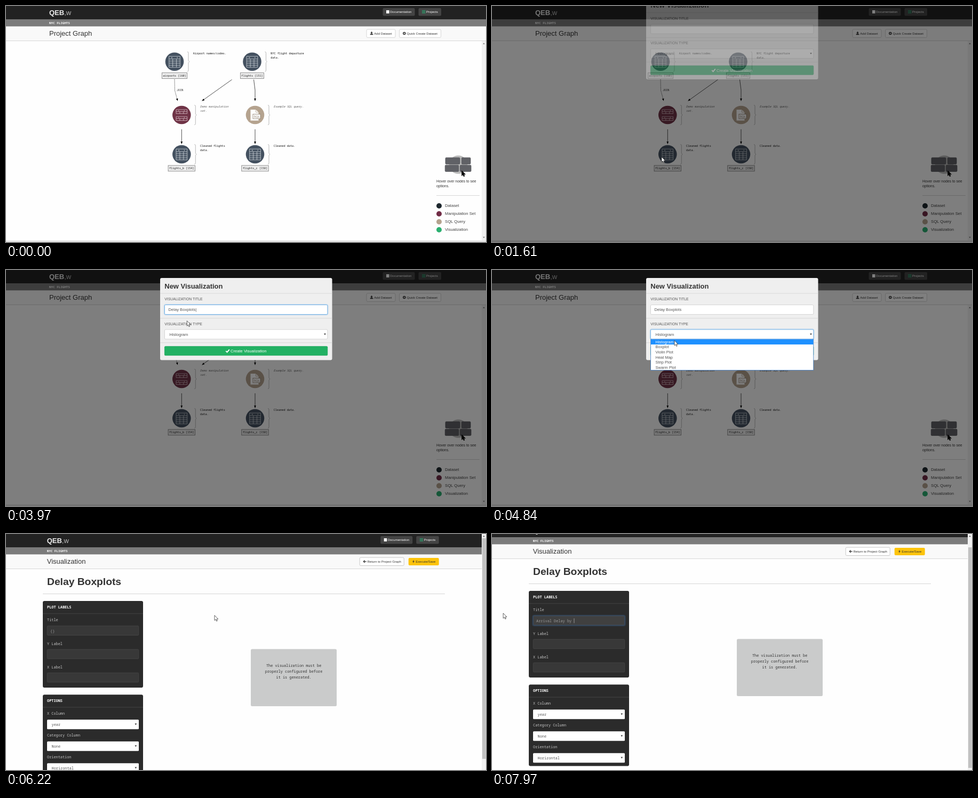
These frames come from a looping animation (900x444 px, 8000 ms). An HTML page:

```html
<!DOCTYPE html>
<html lang="en">
<head>
<meta charset="utf-8">
<title>Project graph</title>
<style>
html, body { margin: 0; width: 100%; height: 100%; overflow: hidden; background: #fff; }
svg { display: block; width: 900px; height: 444px; }
text { font-family: "Liberation Sans", Arial, sans-serif; white-space: pre; }
.m { font-family: "Noto Sans Mono", "DejaVu Sans Mono", monospace; }
.b { font-weight: bold; }
.i { font-style: italic; }
.c { text-anchor: middle; }
</style>
</head>
<body>
<svg id="stage" viewBox="0 0 900 444"></svg>
<script>
const LOOP = 8000, STEP = 125;
const stage = document.getElementById('stage');

// Drawing helpers: each returns SVG markup
const text = (x, y, s, size, fill = '#333', cls = '') =>
  `<text x="${x}" y="${y}" font-size="${size}" fill="${fill}" class="${cls}">${s}</text>`;
const mono = (x, y, s, size = 5.2, fill = '#222', cls = '') => text(x, y, s, size, fill, 'm ' + cls);
const rect = (x, y, w, h, fill, stroke = 'none', r = 0) =>
  `<rect x="${x}" y="${y}" width="${w}" height="${h}" rx="${r}" fill="${fill}" stroke="${stroke}" stroke-width=".8"/>`;
const path = (d, stroke, width = .8, fill = 'none', extra = '') =>
  `<path d="${d}" stroke="${stroke}" stroke-width="${width}" fill="${fill}" ${extra}/>`;
const disc = (x, y, r, fill) => `<circle cx="${x}" cy="${y}" r="${r}" fill="${fill}"/>`;
const group = (x, y, body, opacity = 1) =>
  `<g transform="translate(${x} ${y})" opacity="${opacity}">${body}</g>`;
const hline = (x1, x2, y, color) => path(`M${x1} ${y}H${x2}`, color);
const triangle = (x, y, h = 3, fill = '#333') => path(`M${x - 1.8} ${y - h / 2}h3.6l-1.8 ${h}z`, 'none', 0, fill);
const clamp = v => Math.max(0, Math.min(1, v));

const pointer = (x, y, fill = '#fff', edge = '#222') => group(x, y,
  path('M0 0V9.6L2.2 7.6L3.7 11L5.3 10.3L3.8 7H6.8z', edge, .7, fill));
const beam = (x, y) => path(`M${x - 1.5} ${y - 4.5}h3M${x - 1.5} ${y + 4.5}h3M${x} ${y - 4.5}v9`, '#222', .8);

function header(title, buttons) {
  return rect(0, 0, 900, 25.6, '#222') +
    `<text x="81" y="17" font-size="13" fill="#eee"><tspan class="b">QEB</tspan><tspan fill="#bbb">,w</tspan></text>` +
    rect(706.5, 4, 60, 14.5, '#444', 'none', 2) + rect(713, 8, 5.5, 6, '#fff') +
    text(720, 13.3, 'Documentation', 6, '#fff') +
    rect(773.5, 4, 42.5, 14.5, '#444', 'none', 2) +
    path('M780 8.8h6.5M780 11h6.5M780 13.2h6.5', '#2a9d6c', 1.2) + text(788, 13.3, 'Projects', 6, '#fff') +
    rect(0, 25.6, 900, 13, '#7b7b7b') + mono(81, 34.3, 'NYC FLIGHTS', 5.9, '#fff', 'b') +
    rect(0, 38.6, 900, 27, '#f9f9f9') + hline(0, 900, 65.5, '#d0d0d0') +
    text(81, 56.4, title, 13) + buttons;
}

const tableIcon = () => {
  let d = 'M-10.3 -10H10.3V10.5H-10.3zM-3.4 -5V10.5M3.5 -5V10.5';
  for (let y = -5; y < 9; y += 3.9) d += `M-10.3 ${y}H10.3`;
  return path(d + 'M-6 -8.4l1.6 2M-4.4 -8.4l-1.6 2M4.4 -8.4l.8 1l.8 -1M5.2 -7.4v1', '#dfe4e8', .7);
};
const splitIcon = () => path('M-10.3 -10H10.3V-2.5H-10.3zM-10.3 -6.3H10.3M-3.4 -6.3V-2.5M3.5 -6.3V-2.5' +
  'M-10.3 3H10.3V10.5H-10.3zM-10.3 6.7H10.3M-3.4 6.7V10.5M3.5 6.7V10.5M-5.5 -9v2M5 -9v2M-5.5 4v2M5 4v2', '#e6cfd6', .7);
const sqlIcon = () => path('M-8.5 -10H1.5L6.5 -5V10.5H-8.5z', 'none', 0, '#fff') +
  path('M1.5 -10V-5H6.5', '#b3a18e', .8) + rect(-4, -1.5, 14, 8.5, '#fff', '#8d7d6c') +
  text(3, 5, 'SQL', 5.6, '#8d7d6c', 'c');

function node(x, y, fill, icon, lines, label, cls = '') {
  const w = label.length * 3.12 + 3.6;
  return group(x, y, disc(0, 0, 17.3, fill) + icon() +
    path('M24 -18.5q2 0 2 2V-2l1.8 2L26 2V16.5q0 2 -2 2', '#999', .7) +
    lines.map((s, i) => mono(34.8, -13.8 + 7.8 * i, s, 5.2, cls ? '#555' : '#111', cls)).join('') +
    (label && rect(-w / 2, 21, w, 10.8, '#eee', '#777') + mono(0, 28.2, label, 5.2, '#222', 'c')));
}

function edge(points, dashed) {
  const [[ax, ay], [bx, by]] = points.slice(-2);
  const angle = Math.atan2(by - ay, bx - ax) * 180 / Math.PI;
  return path('M' + points.join('L'), '#222', .8, 'none', dashed ? 'stroke-dasharray="1.6 1.2"' : '') +
    path('M0 0L-4.5 -1.9V1.9z', 'none', 0, '#000', `transform="translate(${bx} ${by}) rotate(${angle})"`);
}

function graphPage() {
  const slate = '#445160';
  const buttons = rect(676, 44, 54, 15.3, '#fff', '#ccc', 2) +
    path('M685.5 48l2.3 2.6h-1.4v2h-1.8v-2h-1.4zM682.7 52.5h5.6v1.8h-5.6z', 'none', 0, '#333') +
    text(690.3, 53.8, 'Add Dataset', 6) +
    rect(737.5, 44, 78, 15.3, '#fff', '#ccc', 2) + disc(746.8, 51.5, 2.8, '#333') +
    path('M745.2 51.5h3.2M746.8 49.9v3.2', '#fff', .8) + text(751.5, 53.8, 'Quick Create Dataset', 6);
  const legend = [['Dataset', '#1d272d'], ['Manipulation Set', '#712c46'],
    ['SQL Query', '#b5a38f'], ['Visualization', '#2bb070']]
    .map(([s, c], i) => disc(812, 376 + 15 * i, 5, c) + text(823, 378.4 + 15 * i, s, 7.7, '#444')).join('');
  const brick = (x, y, w) => rect(x, y, w, 12.2, '#606166', '#55565b', 1.5);
  return rect(0, 0, 900, 444, '#fefefe') + header('Project Graph', buttons) +
    edge([[316, 138], [316.5, 159], [321.8, 178.5]], true) + mono(320, 160, 'JOIN') +
    edge([[423.5, 138.5], [367.5, 178.5]]) +
    edge([[464.5, 138.5], [467, 158], [467, 178.5]]) +
    edge([[329.3, 232], [329.3, 259.5]]) + edge([[467, 232], [467, 259.5]]) +
    node(316, 104.7, slate, tableIcon, ['Airport names/codes.'], 'airports [160]') +
    node(461.5, 104.7, slate, tableIcon, ['NYC flight departure', 'data.'], 'flights [151]') +
    node(329.3, 205, '#6f3346', splitIcon, ['Demo manipulation', 'set.'], '', 'i') +
    node(467, 205, '#b5a38f', sqlIcon, ['Example SQL query.'], '', 'i') +
    node(329.3, 279, slate, tableIcon, ['Cleaned flights', 'data.'], 'flights_b [154]') +
    node(467, 279, slate, tableIcon, ['Cleaned data.'], 'flights_c [158]') +
    disc(848, 298.5, 17.3, '#bbb') +
    brick(824, 285.3, 27) + brick(854.3, 285.3, 16.7) + brick(823.3, 299.3, 25.5) + brick(851.3, 299.3, 20.7) +
    pointer(854.6, 309.8, '#000', '#000') +
    text(807, 331.6, 'Hover over nodes to see', 6.85) + text(807, 340.6, 'options.', 6.85) +
    hline(807, 888, 356.5, '#ccc') + legend +
    rect(892, 66, 8, 375, '#f1f1f1') + triangle(896, 70.5, -2.6, '#777') + triangle(896, 435.5, 2.6, '#777') +
    rect(0, 441, 900, 3, '#e6e6e6');
}

const field = (x, y, w, focus) => (focus ? rect(x - 1, y - 1, w + 2, 20, 'none', '#a9cdec', 2.5) : '') +
  rect(x, y, w, 18, '#fff', focus ? '#5aa3e0' : '#ccc', 2);

const KINDS = ['Histogram', 'Boxplot', 'Violin Plot', 'Heat Map', 'Strip Plot', 'Swarm Plot'];

function typedTitle(t) {
  if (t >= 3485) return 'Delay Boxplots';
  const n = t < 2610 ? 0 : t < 2735 ? 1 : t < 2860 ? 2 : t < 3110 ? 4 : 5;
  return 'Delay'.slice(0, n);
}

function dialog(t) {
  const titleFocus = t >= 2485 && t < 4235, kindFocus = t >= 4235 && t < 5860;
  const hover = t >= 5360, ink = hover ? '#333' : '#fff';
  let out = rect(289, 15, 322.5, 154.5, '#efefef', 'none', 3) +
    text(297.3, 34.8, 'New Visualization', 12.95, '#333', 'b') + hline(289, 611.5, 44, '#d2d2d2') +
    text(297.3, 57.4, 'VISUALIZATION TITLE', 6.87, '#555') + field(297.4, 65.6, 305.4, titleFocus) +
    text(304.6, 77.4, typedTitle(t) + (titleFocus ? '|' : ''), 7.6, '#555') +
    hline(289, 611.5, 90.8, '#d2d2d2') + text(297.3, 103.6, 'VISUALIZATION TYPE', 6.87, '#555') +
    field(297.4, 112, 305.4, kindFocus) + text(306.5, 123.7, KINDS[t < 5235 ? 0 : 1], 7.65, '#555') +
    triangle(598, 121) + hline(289, 611.5, 136.8, '#d2d2d2') +
    rect(297.4, 143.7, 305.4, 17, hover ? '#e6e6e6' : '#22b163', t >= 5860 ? '#5a9be6' : hover ? '#bbb' : '#1fa65c', 1.5) +
    path('M412.3 152.3l2.3 2.4l4.2 -5', ink, 1.9) + text(421, 155, 'Create Visualization', 7.6, ink);
  if (t >= 2610 && t < 3610) {
    out += rect(297.8, 84, 304.8, 26.6, '#fff', '#ccc');
    if (t >= 3360) out += rect(298.2, t < 3485 ? 84.4 : 97.3, 304, 12.9, '#e3e3e3');
    out += ['Delay Histogram', 'Delay Boxplots']
      .map((s, i) => text(301.8, 93.2 + 12.8 * i, s, 6.35, '#111', 'b')).join('');
  }
  if (t >= 4360 && t < 5235) {
    const pick = t < 4985 ? 0 : 1;
    out += rect(297.6, 130.2, 305.2, 58.3, '#fff', '#3a78c2') +
      rect(298, 130.5 + 9.6 * pick, 304.4, 9.6, '#1e90ff') +
      KINDS.map((s, i) => text(306.5, 137.7 + 9.6 * i, s, 7.5, i === pick ? '#fff' : '#555')).join('');
  }
  return out;
}

function graphScene(t) {
  const shade = .5 * clamp((t - 1060) / 450), p = clamp((t - 1485) / 350);
  return graphPage() + `<rect width="900" height="444" opacity="${shade}"/>` +
    (p > 0 ? group(0, -36 * (1 - p * p), dialog(t), p) : '');
}

function plotScene(t) {
  const scroll = t < 6485 ? 0 : t < 6610 ? 10 : 19;
  const focus = t >= 6860;
  const count = Math.round(17 * clamp((t - 7485) / 500));
  const buttons = rect(667.5, 44.2, 83, 15.3, '#fff', '#bbb', 2) +
    path('M680 51.8h-5M677 49.4l-2.4 2.4l2.4 2.4', '#333', 1.2) + text(681.8, 54, 'Return to Project Graph', 6) +
    rect(759, 45, 57, 14, '#fdc40c', 'none', 2) +
    path('M769 48.6l-2.6 3.6h1.8l-.9 3l2.9 -4h-1.8z', 'none', 0, '#333') + text(772.6, 54, 'Execute/Save', 6);
  const label = (y, s, cls) => mono(77, y, s, 6.9, cls ? '#fff' : '#c4c4c4', cls);
  const panel = (y, h, s) => rect(69, y, 188, h, '#2b2b2b', 'none', 3) +
    label(y + 14, s, 'b') + hline(69, 257, y + 23.8, '#4a4a4a');
  const entry = (y, s, lit) => label(y, s) +
    (lit ? rect(76, y + 7.6, 174, 20, 'none', '#34506f', 2.5) : '') +
    rect(77.3, y + 8.6, 171.4, 17.6, lit ? '#404040' : '#383838', lit ? '#405a78' : '#484848', 1.5);
  const choice = (y, s, value) => label(y, s) + rect(77, y + 8.8, 172, 18, '#fff', 'none', 1.5) +
    mono(85.5, y + 20.4, value, 6.9, '#555') + triangle(243.3, y + 17.6);
  const body = text(77, 77, 'Delay Boxplots', 19.25, '#333', 'b') + hline(69, 823, 93.6, '#ccc') +
    panel(107, 163, 'PLOT LABELS') + entry(145.3, 'Title', focus) +
    mono(83, 165.7, count ? 'Arrival Delay by '.slice(0, count) : '{}', 6.9, '#999') +
    (count ? path(`M${83.6 + 4.14 * count} 158.7v9`, '#bbb', .7) : '') +
    entry(189.5, 'Y Label') + entry(233.6, 'X Label') +
    panel(283.2, 153.3, 'OPTIONS') + choice(321.4, 'X Column', 'year') +
    choice(362.4, 'Category Column', 'None') + choice(403.4, 'Orientation', 'Horizontal') +
    rect(459, 197.6, 161, 107.4, '#cacbcb', 'none', 2.5) +
    ['The visualization must be', 'properly configured before', 'it is generated.']
      .map((s, i) => mono(539.6, 231 + 10.8 * i, s, 6.9, '#333', 'c')).join('');
  return rect(0, 0, 900, 444, '#fefefe') +
    group(-4.3, -scroll, header('Visualization', buttons)) + group(0, 19 - scroll, body) +
    rect(892, 0, 8, 444, '#f1f1f1') + rect(893, 8 + scroll * .9, 6.6, 415, '#c1c1c1') +
    triangle(896, 4, -2.6, '#555');
}

// Mouse path: time, x, y
const MOUSE = [[235, 709, 410], [735, 308, 277], [860, 308, 277], [985, 337, 262], [1110, 318, 284],
  [1860, 318, 284], [2360, 338.5, 80.5], [3860, 338.5, 80.5], [4235, 341, 126], [4485, 342, 132.5],
  [4860, 342, 132.5], [4985, 342, 142], [5235, 343, 145], [5610, 391, 153], [6235, 391, 153],
  [6485, 250, 185], [6610, 158, 179], [6735, 152, 164], [6985, 152, 164], [7235, 17, 150], [7360, 21, 149]];

function mouse(t) {
  if (t < MOUSE[0][0]) return '';
  const next = MOUSE.findIndex(k => k[0] > t);
  const [b, c] = next < 0 ? [MOUSE.at(-1), MOUSE.at(-1)] : [MOUSE[next - 1], MOUSE[next]];
  const p = c === b ? 0 : (t - b[0]) / (c[0] - b[0]);
  const x = b[1] + (c[1] - b[1]) * p, y = b[2] + (c[2] - b[2]) * p;
  const overTitle = t > 1860 && t < 4235 && y > 65 && y < 84;
  const overEntry = t >= 6735 && x > 77 && y < 173;
  return overTitle || overEntry ? beam(x, y) : pointer(x, y);
}

let shown;
function draw(now) {
  // The screen is refreshed eight times a second
  const t = 110 + STEP * Math.floor((now % LOOP - 85) / STEP);
  if (t !== shown) {
    shown = t;
    stage.innerHTML = (t < 6235 ? graphScene(t) : plotScene(t)) + mouse(t);
  }
  requestAnimationFrame(draw);
}
draw(performance.now());
</script>
</body>
</html>
```
